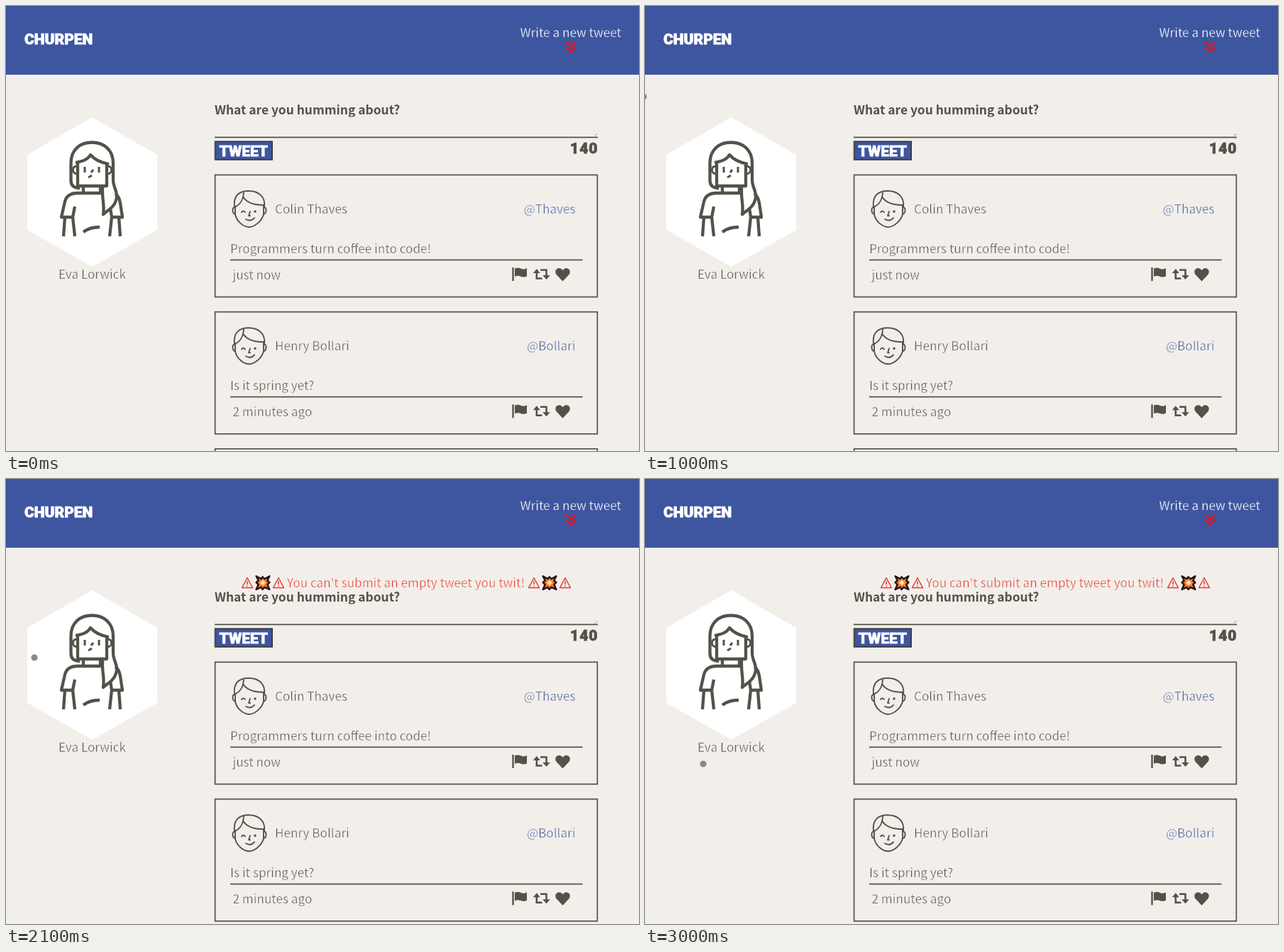
Write an HTML page that moves like this. It is 892x628 px and loops after 3.1 s.

```html
<!DOCTYPE html>
<html lang="en">
<head>
<meta charset="utf-8">
<title>Chirp page</title>
<style>
  :root { --ink: #545149; --blue: #3e56a0; --paper: #f2efea; --loop: 3.1s step-end infinite; }
  html, body { margin: 0; width: 100%; height: 100%; overflow: hidden; background: var(--paper); }
  svg { display: block; }
  /* a hairline in the background colour thins the regular weight */
  text {
    font: 300 17.15px "Noto Sans CJK JP", "Noto Sans CJK SC", "Noto Sans", sans-serif;
    fill: var(--ink); stroke: var(--paper); stroke-width: .5;
  }
  .label { font-weight: 600; font-size: 17.4px; stroke: none; }
  .loud { font: 900 21px Roboto, sans-serif; stroke-width: .8; stroke: currentColor; fill: currentColor; }
  .light { color: #fff; }
  .dark { color: var(--ink); letter-spacing: 1px; }
  .link { fill: #fff; stroke: var(--blue); stroke-width: .3; }
  .handle { fill: var(--blue); text-anchor: end; }
  .mid { text-anchor: middle; }
  .line { fill: none; stroke: var(--ink); stroke-width: 1.9; stroke-linecap: round; stroke-linejoin: round; }
  .rule { fill: none; stroke: var(--ink); stroke-width: 1.7; }
  .solid { fill: var(--ink); }
  .arrows { fill: none; stroke: #e0141f; stroke-width: 2.8; animation: dim var(--loop); }
  .feed { animation: drop var(--loop); }
  .error { animation: show var(--loop); }
  .error text { fill: #e8392f; }
  .dot { fill: #8b8988; animation: roam var(--loop); }

  @keyframes dim { 48.38% { stroke: #a3191d; } 61.28%, 100% { stroke: #e0141f; } }
  @keyframes drop { 0% { transform: none; } 48.38%, 100% { transform: translateY(20px); } }
  @keyframes show { 0% { visibility: hidden; } 61.28%, 100% { visibility: visible; } }
  @keyframes roam {
    0% { transform: translate(-12px, 160px); }
    16.12% { transform: translate(-3px, 146px); }
    19.35% { transform: translate(-2px, 142px); }
    22.57% { transform: translate(-2px, 138px); }
    25.8% { transform: translate(-2px, 133px); }
    29.02% { transform: translate(-2px, 130px); }
    32.25% { transform: translate(-2px, 128px); }
    61.28% { transform: translate(4px, 160px); }
    64.51% { transform: translate(20px, 206px); }
    67.73% { transform: translate(40px, 252px); }
    70.96% { transform: translate(57px, 298px); }
    74.18% { transform: translate(71px, 336px); }
    77.41% { transform: translate(80px, 364px); }
    80.64% { transform: translate(85px, 379px); }
    83.86% { transform: translate(86px, 387px); }
    87.09% { transform: translate(84px, 396px); }
    90.31%, 100% { transform: translate(82px, 402px); }
  }
</style>
</head>
<body>
<svg width="892" height="628" viewBox="0 0 892 628">
  <defs>
    <g id="face" class="line">
      <path d="M28 46C26 30 34 23 48 23S72 31 70 46M28 46C35 43 40 38 41 25M40 31C45 40 55 43 70 43"/>
      <path d="M29 45V56C31 67 42 74 48.500 74S66 67 69 56V43"/>
      <path d="M28 46C24 47 25 55 29 56M70 46C74 47 73 55 69 56"/>
      <path d="M38 53q2.500 -3 5 0M50 52L48 58H50M44 63Q51 67 56 61"/>
      <circle cx="57" cy="52" r=".8" class="solid"/>
    </g>
    <g id="icons">
      <path class="solid" d="M419.300 131h2.400v19h-2.400zM423 132.500q4-2 8.500 0t8.500-.5v11.500q-4 2-8.500 .2t-8.500 .3z"/>
      <path class="solid" d="M448.800 139l5-6 5 6zM462.200 142l5.300 6 5.200-6z"/>
      <path d="M453.800 138V146.500H461.500M459 134.500H467.500V143" fill="none" stroke="#545149" stroke-width="2.600"/>
      <path class="solid" d="M490.500 150.500L482 141.500C478.500 137.500 480.500 132 485.500 132C488 132 489.500 133.500 490.500 135C491.500 133.500 493 132 495.500 132C500.500 132 502.500 137.500 499 141.500Z"/>
    </g>
    <g id="warn" fill="none" stroke="#e8392f" stroke-width="1.500" stroke-linejoin="round">
      <path d="M8.500 1.500L16 15.500H1ZM8.500 6v5M8.500 12.500v1.500"/>
    </g>
    <g id="boom" stroke-linejoin="round">
      <path d="M1 1L8 5L10 2L13 5L20 1L17 7L20 10L17 13L20 20L13 17L10 20L8 17L1 20L4 13L1 10L4 7Z" fill="#e33b22" stroke="#1c1512" stroke-width="2.200"/>
      <path d="M5 5L9 7L10.500 4L12 7L16 5L14.500 9L17 10.500L14.500 12L16 16L12 14L10.500 17L9 14L5 16L6.500 12L4 10.500L6.500 9Z" fill="#f79a36"/>
      <path d="M10.500 6.500L12 9L14.500 10.500L12 12L10.500 14.500L9 12L6.500 10.500L9 9Z" fill="#fff1c4"/>
    </g>
  </defs>

  <rect width="892" height="628" fill="#f2efea"/>
  <rect width="892" height="97" fill="#3e56a0"/>
  <text class="loud light" x="26" y="53.500">CHURPEN</text>
  <text class="link" x="724.500" y="44">Write a new tweet</text>
  <path class="arrows" d="M789.500 50.500L796.300 57L803 50.500M789.500 58L796.300 64.500L803 58"/>

  <path d="M121.500 157L213 210V316L121.500 368L30 316V210Z" fill="#fff"/>
  <g class="line" style="stroke-width:4.300;stroke-linecap:butt">
    <path d="M104 257C95 257 91.500 253 91.500 246V222C91.500 203 104 192.500 121 192.500S151 203 151 222V246C151 257 160 264 154 277C151 285 144 288 137 294C139 282 136 276 136 263V255"/>
    <path d="M101 220V254H142V222M98 221C108 219 115 217 119 210C125 217 133 221 145 223"/>
    <path d="M101 226C92 225 92 237 101 237M142 226C151 225 151 237 142 237" stroke-width="3"/>
    <path d="M111 227v8M131 227v8M123 231L120 235M116 242L121 239" stroke-width="3"/>
    <path d="M109 254V263M133 254V263M137 264H101C91 264 85 268 83 276L78 298H94M97 283L94 298L97 325M83 298L81 325"/>
    <path d="M154 265C159 268 160 273 161 278L164 298H149M147 285L149 298L146 325M159 298L161 325M109 319Q118 312 132 312"/>
  </g>
  <text class="mid" x="121.500" y="385">Eva Lorwick</text>

  <g class="error">
    <use href="#warn" x="331.500" y="138"/><use href="#boom" x="351.500" y="136"/><use href="#warn" x="375.500" y="138"/>
    <text x="396" y="153">You can't submit an empty tweet you twit!</text>
    <use href="#warn" x="735.500" y="138"/><use href="#boom" x="755.500" y="136"/><use href="#warn" x="779.500" y="138"/>
  </g>

  <g class="feed">
    <text class="label" x="294" y="153">What are you humming about?</text>
    <rect x="294" y="156.500" width="540" height="28" fill="#f2efea"/>
    <path class="rule" d="M294 185.300H834"/>
    <path d="M830 183.500L833.500 180" stroke="#8d8983"/>
    <rect x="295" y="191.300" width="80" height="25.500" fill="#3e56a0" stroke="#3c3b40" stroke-width="2"/>
    <path d="M294 217.500V190.500H376" fill="none" stroke="#77787f"/>
    <text class="loud light" x="300.500" y="211.500">TWEET</text>
    <text class="loud dark" x="834.500" y="207.500" text-anchor="end">140</text>
    <g id="cards"></g>
  </g>
  <circle class="dot" r="4.600"/>
</svg>
<script>
  const tweets = [
    ["Colin Thaves", "@Thaves", "Programmers turn coffee into code!", "just now"],
    ["Henry Bollari", "@Bollari", "Is it spring yet?", "2 minutes ago"],
    ["", "", "", ""]
  ];
  const card = ([name, handle, body, age], i) => `
    <g transform="translate(294 ${238 + 193.3 * i})">
      <rect class="rule" x=".6" y=".4" width="538.7" height="172.2"/>
      <use href="#face"/>
      <text x="85" y="55">${name}</text>
      <text class="handle" x="508.500" y="55">${handle}</text>
      <text x="22" y="111">${body}</text>
      <path class="rule" d="M22 120.300H518.500"/>
      <text x="25.500" y="148">${age}</text>
      <use href="#icons"/>
    </g>`;
  document.getElementById("cards").innerHTML = tweets.map(card).join("");
</script>
</body>
</html>
```
